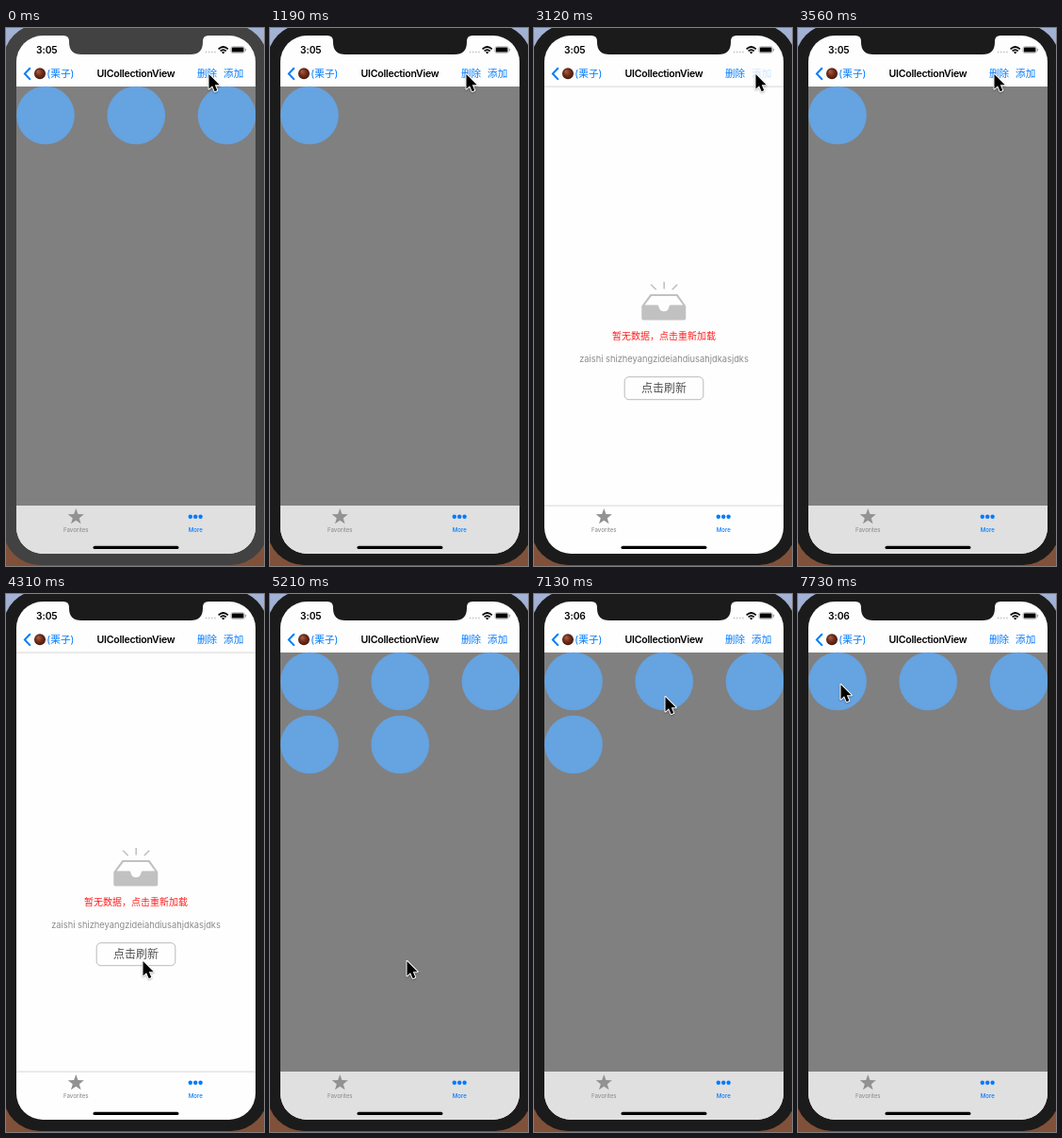
An HTML page with a canvas that plays this animation: 274 by 570 pixels, repeating every 8 s.

```html
<!DOCTYPE html>
<html lang="zh">
<head>
<meta charset="utf-8">
<style>
html, body { margin: 0; width: 100%; height: 100%; overflow: hidden; }
canvas { display: block; width: 274px; height: 570px; }
</style>
</head>
<body>
<canvas id="stage"></canvas>
<script>
const W = 274, H = 570, LOOP = 8000, TICK = 148.4;
const BLUE = '#007aff', DISC = '#65a3e1';
const SANS = 'Inter, "Noto Sans CJK SC", "Noto Sans CJK", sans-serif';
const HAN = '"Noto Sans CJK SC", "Noto Sans CJK", sans-serif';

const canvas = document.getElementById('stage');
const dpr = window.devicePixelRatio || 1;
canvas.width = W * dpr;
canvas.height = H * dpr;
const c = canvas.getContext('2d');

// Pointer path: tick, x, y
const pointer = [
  [0, 215, 49], [1, 213, 49], [2, 208, 49], [13, 208, 49],
  [14, 214, 51], [16, 231, 52], [17, 235, 49], [21, 235, 49],
  [24, 208, 49], [27, 208, 49], [28, 178, 230], [29, 145, 389],
  [37, 145, 389], [38, 152, 410], [39, 166, 455], [40, 174, 482],
  [41, 171, 415], [42, 160, 285], [43, 147, 160], [44, 139, 109],
  [48, 139, 109], [49, 92, 104], [50, 45, 96]
];

// n cells, cell k fades out between t0 and t1 (fades in when t0 > t1)
const scenes = [
  { at: 0, n: 3, k: 2, t0: 2, t1: 4 },
  { at: 5, n: 2, k: 1, t0: 6, t1: 8 },
  { at: 9, n: 1, k: 0, t0: 10, t1: 11 },
  { at: 11, n: 0 },
  { at: 22, n: 1, k: 0, t0: 24, t1: 22 },
  { at: 27, n: 0 },
  { at: 35, n: 5, k: 1, t0: 45, t1: 48 },
  { at: 49, n: 4, k: 0, t0: 50, t1: 52 }
];
const removePress = [2, 6, 10, 26], addPress = [20, 21];

const clamp = v => Math.max(0, Math.min(1, v));
const mix = (a, b, p) => a + (b - a) * p;
const smooth = p => p * p * (3 - 2 * p);
const slot = i => [42 + 96.25 * (i % 3), 92.5 + 67 * Math.floor(i / 3)];

function along(keys, t) {
  let i = keys.findIndex(k => k[0] > t);
  if (i < 0) return keys[keys.length - 1].slice(1);
  const a = keys[i - 1], b = keys[i], p = (t - a[0]) / (b[0] - a[0]);
  return [mix(a[1], b[1], p), mix(a[2], b[2], p)];
}

function pressAlpha(list, t) {
  if (list.includes(t)) return 0.2;
  return list.includes(t - 1) ? 0.6 : 1;
}

function box(x, y, w, h, r, fill) {
  c.beginPath();
  c.roundRect(x, y, w, h, r);
  c.fillStyle = fill;
  c.fill();
}

function disc(x, y, r, fill) {
  c.beginPath();
  c.arc(x, y, r, 0, Math.PI * 2);
  c.fillStyle = fill;
  c.fill();
}

function line(d, color, width) {
  c.strokeStyle = color;
  c.lineWidth = width;
  c.stroke(new Path2D(d));
}

function shape(d, color) {
  c.fillStyle = color;
  c.fill(new Path2D(d), 'evenodd');
}

function label(text, x, y, size, color, { weight = 400, align = 'center', font = SANS, space = 0 } = {}) {
  c.font = `${weight} ${size}px ${font}`;
  c.letterSpacing = space + 'px';
  c.textAlign = align;
  c.fillStyle = color;
  c.fillText(text, x, y);
}

function drawBody(shade) {
  const g = c.createLinearGradient(0, 0, 0, H);
  g.addColorStop(0, '#a3b3d6');
  g.addColorStop(0.5, '#8d6c66');
  g.addColorStop(1, '#805039');
  c.fillStyle = g;
  c.fillRect(0, 0, W, H);
  box(-3, -4, 281, 573, 39, shade);
}

function drawNotch(shade) {
  shape('M61 7V8Q67 8 67 14V15Q67 28 80 28H196Q209 28 209 15V14Q209 8 215 8V7Z', shade);
}

function drawStatus(t) {
  label(t < 41 ? '3:05' : '3:06', 32, 27, 10.3, '#000', { weight: 600, align: 'left', space: -0.1 });
  for (let i = 0; i < 4; i++) disc(212.5 + i * 3.1, 25.5, 0.9, '#c8c8c8');
  line('M225.6 22.3Q230.7 17.7 235.8 22.3', '#000', 1.7);
  line('M227.6 24.4Q230.7 21.7 233.8 24.4', '#000', 1.6);
  shape('M228.9 25.6Q230.7 24.2 232.5 25.6L230.7 27.4Z', '#000');
  c.beginPath();
  c.roundRect(238.9, 19.7, 14.4, 6.8, 2);
  c.strokeStyle = '#a0a0a0';
  c.lineWidth = 0.7;
  c.stroke();
  box(239.8, 20.6, 12.6, 5, 1.2, '#000');
  box(254, 21.8, 1, 2.6, 0.5, '#a0a0a0');
}

function drawNav(t) {
  c.lineCap = 'round';
  line('M25.3 42.7L19.9 48.4L25.3 54.1', BLUE, 2);
  c.lineCap = 'butt';
  const g = c.createRadialGradient(34, 46, 0.5, 36, 48.3, 7);
  g.addColorStop(0, '#a65a3c');
  g.addColorStop(0.5, '#6f2c1a');
  g.addColorStop(1, '#3a170f');
  disc(36, 48.3, 6, g);
  label('(栗子)', 43.3, 52.2, 10.7, BLUE, { align: 'left' });
  label('UICollectionView', 138, 52.2, 10.6, '#000', { weight: 600, space: -0.28 });
  c.globalAlpha = pressAlpha(removePress, t);
  label('删除', 213.5, 52.3, 10.6, BLUE, { font: HAN });
  c.globalAlpha = pressAlpha(addPress, t);
  label('添加', 241.7, 52.3, 10.6, BLUE, { font: HAN });
  c.globalAlpha = 1;
}

function drawTabs() {
  c.beginPath();
  for (let i = 0; i < 10; i++) {
    const r = i % 2 ? 3.7 : 9, a = -Math.PI / 2 + i * Math.PI / 5;
    c.lineTo(74.3 + r * Math.cos(a), 518 + r * Math.sin(a));
  }
  c.closePath();
  c.fillStyle = '#929292';
  c.fill();
  label('Favorites', 74.3, 534, 6.1, '#929292', { weight: 500 });
  for (const x of [195.8, 201.2, 206.6]) disc(x, 517.8, 2.2, BLUE);
  label('More', 201.2, 534, 6.1, BLUE, { weight: 500 });
  box(92.5, 548.8, 91, 3.2, 1.6, '#000');
}

function drawEmpty() {
  const grey = '#c1c1c1';
  line('M138.2 269V276.5M124.2 271.8L129.7 277.2M152.2 271.8L146.7 277.2', grey, 1.6);
  shape('M123.5 282H152.5L161.3 294.5V307Q161.3 309.6 158.7 309.6H116.9Q114.3 309.6 114.3 307V294.5Z' +
    'M124.8 283.9L117.6 293.5H131.4Q132.4 293.5 132.4 295Q133.4 300.3 138 300.3Q142.6 300.3 143.6 295Q143.6 293.5 144.6 293.5H158.2L151.2 283.9Z', grey);
  label('暂无数据，点击重新加载', 138, 330.3, 10, '#ff1c1c', { font: HAN });
  label('zaishi shizheyangzideiahdiusahjdkasjdks', 138, 353.8, 9.3, '#8a8a8a');
  c.beginPath();
  c.roundRect(96.2, 369.7, 83.6, 24, 4.5);
  c.strokeStyle = '#aaa';
  c.lineWidth = 0.8;
  c.stroke();
  label('点击刷新', 138, 386, 12, '#505050', { font: HAN });
}

function drawCells(s, t) {
  const p = smooth(clamp((t - s.t0) / (s.t1 - s.t0)));
  for (let i = 0; i < s.n; i++) {
    let [x, y] = slot(i);
    if (i > s.k) {
      const [px, py] = slot(i - 1);
      x = mix(x, px, p);
      y = mix(y, py, p);
    }
    c.globalAlpha = i === s.k ? 1 - p : 1;
    disc(x, y, 30.8, DISC);
  }
  c.globalAlpha = 1;
}

function drawPointer(t) {
  const [x, y] = along(pointer, t);
  const d = 'M0 0V15.5L3.6 12.2L6.2 18.2L8.8 17.1L6.3 11.3H11.2Z';
  c.save();
  c.translate(x + 0.5, y);
  c.shadowColor = 'rgba(0,0,0,.3)';
  c.shadowBlur = 2 * dpr;
  c.shadowOffsetY = dpr;
  c.lineJoin = 'round';
  line(d, '#fff', 2);
  c.shadowColor = 'transparent';
  shape(d, '#000');
  c.restore();
}

function draw(t) {
  const scene = scenes.filter(s => s.at <= t).pop();
  const full = scene.n > 0;
  const shade = t < 1 ? '#424242' : '#1b1b1b';
  c.setTransform(dpr, 0, 0, dpr, 0, 0);
  drawBody(shade);

  c.save();
  c.beginPath();
  c.roundRect(11, 8, 254, 549, 28);
  c.clip();
  c.fillStyle = '#fefefe';
  c.fillRect(11, 8, 254, 549);
  if (full) {
    c.fillStyle = '#808080';
    c.fillRect(11, 62, 254, 444);
    drawCells(scene, t);
    c.fillStyle = '#e0e0e0';
    c.fillRect(11, 506, 254, 51);
  } else {
    c.fillStyle = '#d2d2d2';
    c.fillRect(11, 61.6, 254, 0.9);
    c.fillRect(11, 505.6, 254, 0.9);
    drawEmpty();
  }
  drawNotch(shade);
  drawStatus(t);
  drawNav(t);
  drawTabs();
  c.restore();
  drawPointer(t);
}

function loop() {
  draw(Math.floor((performance.now() % LOOP + 5) / TICK));
  requestAnimationFrame(loop);
}
loop();
</script>
</body>
</html>
```
